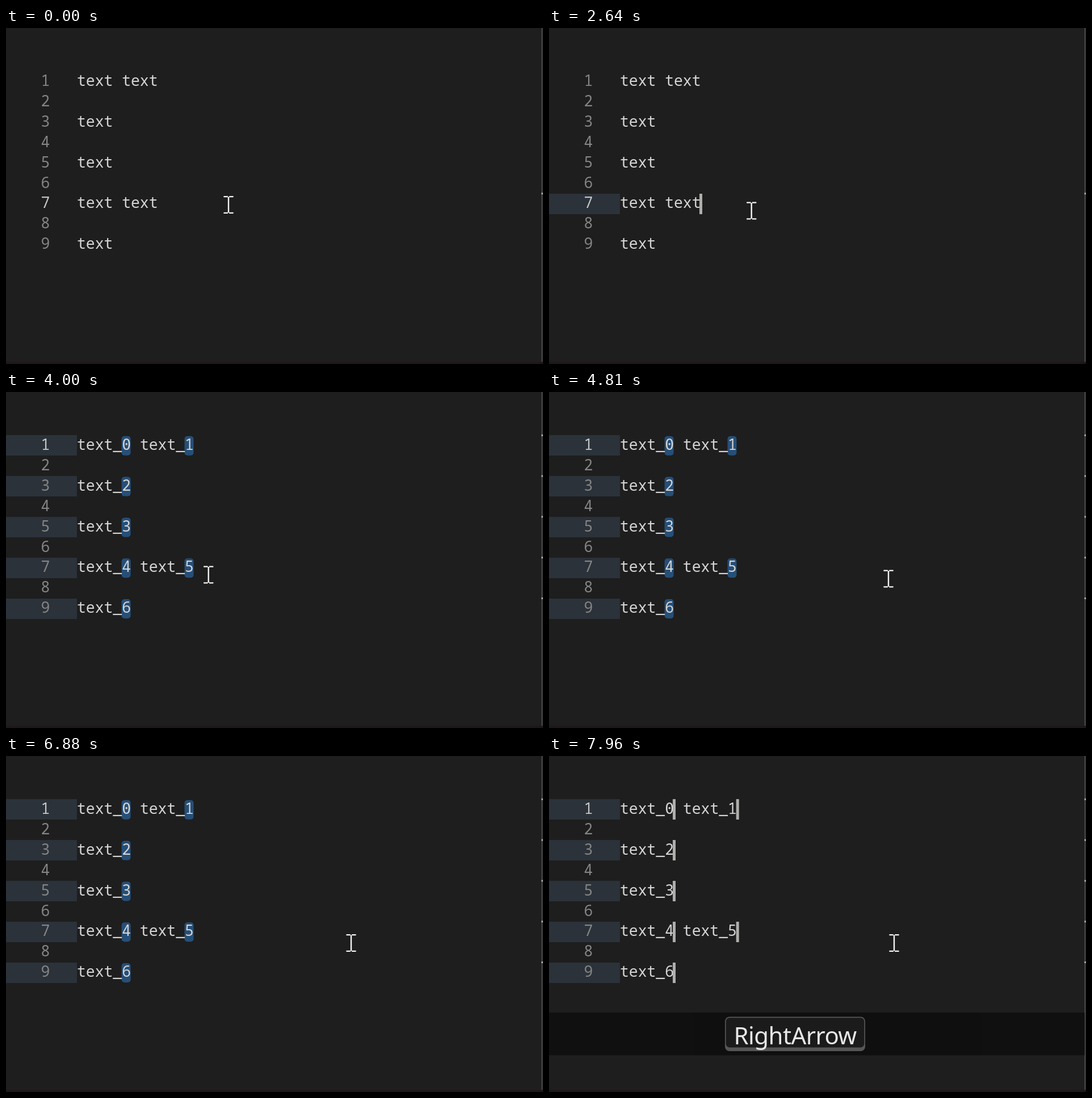
These frames come from a looping animation (946 by 592 pixels, 8 s). An HTML page:

```html
<!DOCTYPE html>
<html lang="en">
<head>
<meta charset="utf-8">
<title>Numbering multiple cursors</title>
<style>
  html, body { margin: 0; width: 100%; height: 100%; overflow: hidden; background: #1e1e1e; }
  svg { display: block; width: 946px; height: 592px; }
  .code text { font: 26.4px "Noto Sans Mono", "DejaVu Sans Mono", monospace; white-space: pre; fill: #d4d4d4; }
  .code .zero { font-family: "DejaVu Sans Mono", monospace; }
  .code .num { fill: #858585; text-anchor: middle; }
  .code .num.active { fill: #c6c6c6; }
  .key text { font: 42px "Noto Sans", "Open Sans", sans-serif; fill: #f2f2f2; text-anchor: middle; }
</style>
</head>
<body>
<svg id="stage" viewBox="0 0 946 592"></svg>
<script>
const LOOP = 8000, TOP = 76.3, LINE = 35.9, LEFT = 125, CHAR = 15.84;
const stage = document.getElementById('stage');

function add(parent, tag, attrs = {}, text) {
  const el = document.createElementNS('http://www.w3.org/2000/svg', tag);
  for (const name in attrs) el.setAttribute(name, attrs[name]);
  if (text !== undefined) el.textContent = text;
  parent.append(el);
  return el;
}
const group = (parent, attrs) => add(parent, 'g', attrs);
const rect = (parent, x, y, width, height, fill, rx = 0) =>
  add(parent, 'rect', { x, y, width, height, fill, rx });
const rowY = line => TOP + (line - 1) * LINE;
const show = (el, on) => el.setAttribute('visibility', on ? 'visible' : 'hidden');

rect(stage, 0, 0, 946, 592, '#1e1e1e');
rect(stage, 0, 588, 946, 4, '#20171b');
rect(stage, 943.5, 0, 1.5, 588, '#555');

const ODD = [1, 3, 5, 7, 9];
const PAIRED = [1, 7];

// Row highlights and ruler marks
function makeRows(lines) {
  const rows = group(stage);
  for (const n of lines) rect(rows, 0, Math.round(rowY(n)), LEFT, 36, '#2b323a');
  return rows;
}
function makeMarks(lines) {
  const marks = group(stage);
  for (const n of lines) rect(marks, 943, rowY(n) - 1.5, 3, 3, '#a0a0a0');
  return marks;
}
const singleRow = makeRows([7]), allRows = makeRows(ODD);
const singleMark = makeMarks([7]), allMarks = makeMarks(ODD);

// Selected digits sit at columns 5 and 12
const selection = group(stage);
for (const n of ODD) {
  for (const col of PAIRED.includes(n) ? [5, 12] : [5]) {
    rect(selection, LEFT + col * CHAR - 0.6, rowY(n) + 1.5, 16, 34, '#264f78', 5);
  }
}

const code = group(stage, { class: 'code' });
const numbers = [];
for (let n = 1; n <= 9; n++) {
  numbers.push(add(code, 'text', { class: 'num', x: 69.5, y: rowY(n) + 25.7 }, n));
}

function makeText(numbered) {
  const layer = group(code);
  let count = 0;
  for (const n of ODD) {
    const line = add(layer, 'text', { x: LEFT, y: rowY(n) + 25.7 });
    for (let i = 0; i < (PAIRED.includes(n) ? 2 : 1); i++) {
      add(line, 'tspan', {}, (i ? ' ' : '') + 'text' + (numbered ? '_' : ''));
      if (numbered) {
        add(line, 'tspan', count ? {} : { class: 'zero' }, count);
        count++;
      }
    }
  }
  return layer;
}
const plainText = makeText(false), numberedText = makeText(true);

function makeCarets(first, second) {
  const carets = group(stage);
  for (const n of ODD) {
    for (const x of PAIRED.includes(n) ? [first, second] : [first]) {
      rect(carets, x, Math.round(rowY(n)), 5, 36, '#aeafad');
    }
  }
  return carets;
}
const carets = {
  single: rect(stage, 265, Math.round(rowY(7)), 5, 36, '#aeafad'),
  after: makeCarets(218, 329.7),
  before: makeCarets(202, 313.7)
};

const ring = add(stage, 'circle', {
  cx: 388.5, cy: 309.5, r: 19.7, fill: 'none', stroke: '#f00', 'stroke-width': 3.6
});
const pointer = add(stage, 'path', {
  d: 'M-8.6-14.4H-1.2M1.2-14.4H8.6M-8.6 14.4H-1.2M1.2 14.4H8.6M0-14V14',
  stroke: '#f4f4f4', 'stroke-width': 2.4, fill: 'none'
});

// Key press banner
const banner = group(stage);
rect(banner, 0, 452, 944, 75.3, '#000').setAttribute('fill-opacity', 0.5);
function makeKey(label, width, spacing) {
  const key = group(banner, { class: 'key' });
  const x = 433.5 - width / 2;
  rect(key, x, 459.5, width, 60.5, '#5a5a5a', 8);
  rect(key, x + 1.7, 461.2, width - 3.4, 52.3, '#1b1b1b', 6.5);
  add(key, 'text', { x: 434 + spacing / 2, y: 508, 'letter-spacing': spacing }, label);
  return key;
}
const keys = {
  alt: makeKey('Alt+Y', 138, 1.2),
  left: makeKey('LeftArrow', 217, -0.9),
  right: makeKey('RightArrow', 247, -0.6)
};

// Each track is a list of [time, value] held until the next entry
const tracks = {
  pointer: [[0, [392, 311.5]], [660, [391, 311]], [1050, [371, 317]], [1180, [356.7, 322]],
    [4600, [384, 323]], [4670, [455, 326]], [4740, [545, 328]], [4810, [598, 329]],
    [4880, [612, 329.5]], [4950, [608, 329.5]]],
  caret: [[0, ''], [660, 'single'], [1180, ''], [1650, 'single'], [2180, ''], [2640, 'single'],
    [3190, ''], [3260, 'after'], [3730, ''], [4270, 'after'], [4810, ''], [5210, 'after'],
    [5760, ''], [6220, 'after'], [6750, ''], [6890, 'before'], [7360, ''], [7820, 'after']],
  key: [[0, ''], [3260, 'alt'], [4000, ''], [6890, 'left'], [7690, ''], [7820, 'right']]
};
const FADE = [[0, 0.4], [70, 0.8], [130, 0.95], [200, 1]];

const entry = (track, t) => track.filter(step => step[0] <= t).pop();
const value = (name, t) => entry(tracks[name], t)[1];

function render(t) {
  const focused = t >= 660, edited = t >= 3260;
  show(singleRow, focused && !edited);
  show(allRows, edited);
  show(singleMark, !edited);
  show(allMarks, edited);
  show(plainText, !edited);
  show(numberedText, edited);
  show(selection, edited && t < 6890);
  show(ring, t >= 660 && t < 730);
  numbers.forEach((el, i) => el.classList.toggle('active', i === (edited ? 0 : 6)));

  const caret = value('caret', t);
  for (const name in carets) show(carets[name], name === caret);
  pointer.setAttribute('transform', `translate(${value('pointer', t)})`);

  const [start, key] = entry(tracks.key, t);
  show(banner, key !== '');
  for (const name in keys) show(keys[name], name === key);
  banner.setAttribute('opacity', entry(FADE, t - start)[1]);
}

const began = performance.now();
function frame() {
  render((performance.now() - began) % LOOP);
  requestAnimationFrame(frame);
}
render(0);
requestAnimationFrame(frame);
</script>
</body>
</html>
```
